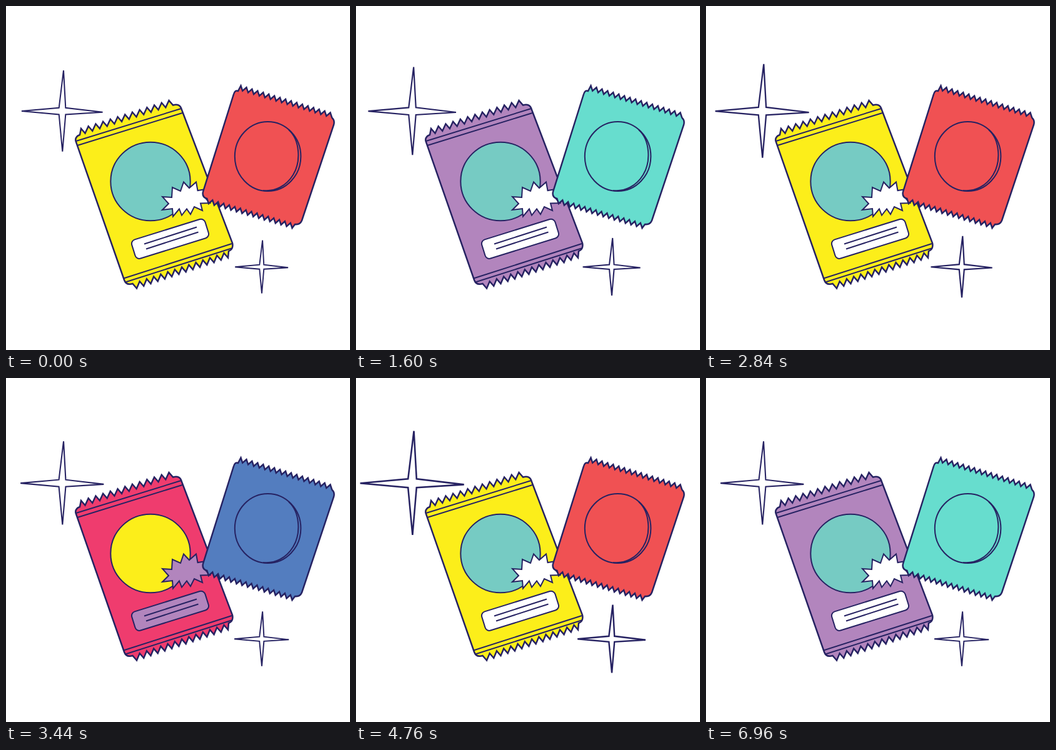
Write an HTML page that moves like this. It is 550 px wide and 550 px high and loops after 7 s.

```html
<!DOCTYPE html>
<html lang="en">
<head>
<meta charset="utf-8">
<title>Two packets</title>
<style>
  html, body { margin: 0; width: 100%; height: 100%; overflow: hidden; background: #fff; }
  svg { display: block; width: 100vw; height: 100vh; }
  .ink { stroke: #262262; stroke-width: 2; fill: none; }
  .outline { stroke-width: 2.5; }
  .pack { fill: var(--pack); }
  .disc { fill: var(--disc); }
  .tag { fill: var(--tag); }
  .back { fill: var(--back); }
</style>
</head>
<body>
<svg id="stage" viewBox="0 0 550 550">
  <path id="left" class="ink outline pack"/>
  <path class="ink" d="M112 216L280 164M114 223L282 171M188 435.5L361 380M191 441.5L362 387"/>
  <ellipse class="ink disc" cx="231" cy="280.5" rx="63.7" ry="62.8"/>
  <path class="ink tag" d="M250 305L265 306L266 290L279 296L284 281.5L293 291L304 281.5L306.5 295L319 293L315 303L326 315L311 315.5L314 327L301 321L295 333L289 324.5L281 334.5L277 324.5L267 336.5L266 324L250 326L260 316Z"/>
  <rect class="ink tag" x="-61.4" y="-15.8" width="122.8" height="31.6" rx="7"
        transform="translate(262.5 372.3) rotate(-17.3)"/>
  <path class="ink" d="M221 380.5L305 353.5M224 388.5L307.5 361.5"/>

  <path id="right" class="ink outline back"/>
  <ellipse class="ink" cx="418.6" cy="240.5" rx="52.8" ry="55.5"/>
  <path class="ink" d="M452 198C470 214 472 249 459 270C448 288 430 297 411 295"/>

  <g id="stars"></g>
</svg>
<script>
const LOOP = 7000, HOLD = 733, PULSE = 880;

const themes = [
  { pack: '#fcee1a', disc: '#76cbc3', tag: '#ffffff', back: '#f05153' },
  { pack: '#ef3c6e', disc: '#fcee1a', tag: '#b285bd', back: '#537dbf' },
  { pack: '#b285bd', disc: '#76cbc3', tag: '#ffffff', back: '#67ddce' }
];

const byId = id => document.getElementById(id);

// Zigzag of n tips between two points, each followed by a valley
function teeth(x1, y1, x2, y2, n, dx, dy) {
  let d = '';
  for (let i = 0; i < n; i++) {
    const k = i / (n - 1);
    const x = x1 + (x2 - x1) * k, y = y1 + (y2 - y1) * k;
    d += `L${x} ${y}L${x + dx} ${y + dy}`;
  }
  return d;
}

byId('left').setAttribute('d',
  'M111.5 216Q110 209 118 206' + teeth(120, 196, 260.5, 151, 13, 6.5, 7.5) +
  'Q278 155 281 166L362 379Q364 389 356 392' +
  teeth(355, 402.5, 209, 451.5, 14, -6.5, -7.5) + 'Q192 447 189 438Z');

byId('right').setAttribute('d',
  'M315 297L364 141Q366 134 371 136' + teeth(375.5, 127.5, 518.5, 170.5, 17, 2.7, 8.1) +
  'Q526 183 524 190L473 343Q470 350 462 349' +
  teeth(457.5, 355, 324, 316, 16, -2.7, -8.1) + 'Q313 306 315 297Z');

const STAR = 'M2 -64.8L5.3 -5L64.5 2L5.3 5.7L.3 64.8L-5.3 5.7L-65 .3L-5.3 -5Z';

const stars = [[90, 167.8, 1, 2], [408.8, 417, 0.655, 2.9]].map(([x, y, size, line]) => {
  const el = document.createElementNS('http://www.w3.org/2000/svg', 'path');
  el.setAttribute('d', STAR);
  el.setAttribute('class', 'ink');
  el.style.strokeWidth = line;
  byId('stars').append(el);
  return { el, x, y, size };
});

// Linear swell, linear shrink, short rest
function pulse(t) {
  const p = t % PULSE;
  const k = p < 400 ? p / 400 : Math.max(0, (840 - p) / 440);
  return 1 + 0.312 * k;
}

let shown = -1;
function draw(now) {
  const t = now % LOOP;
  const theme = Math.min(Math.floor(t / HOLD), 8) % 3;
  if (theme !== shown) {
    shown = theme;
    for (const [name, color] of Object.entries(themes[theme])) {
      byId('stage').style.setProperty('--' + name, color);
    }
  }
  const s = pulse(t);
  for (const { el, x, y, size } of stars) {
    el.setAttribute('transform', `translate(${x} ${y}) scale(${s * size})`);
  }
}

const start = performance.now();
function tick() {
  draw(performance.now() - start);
  requestAnimationFrame(tick);
}
tick();
</script>
</body>
</html>
```
